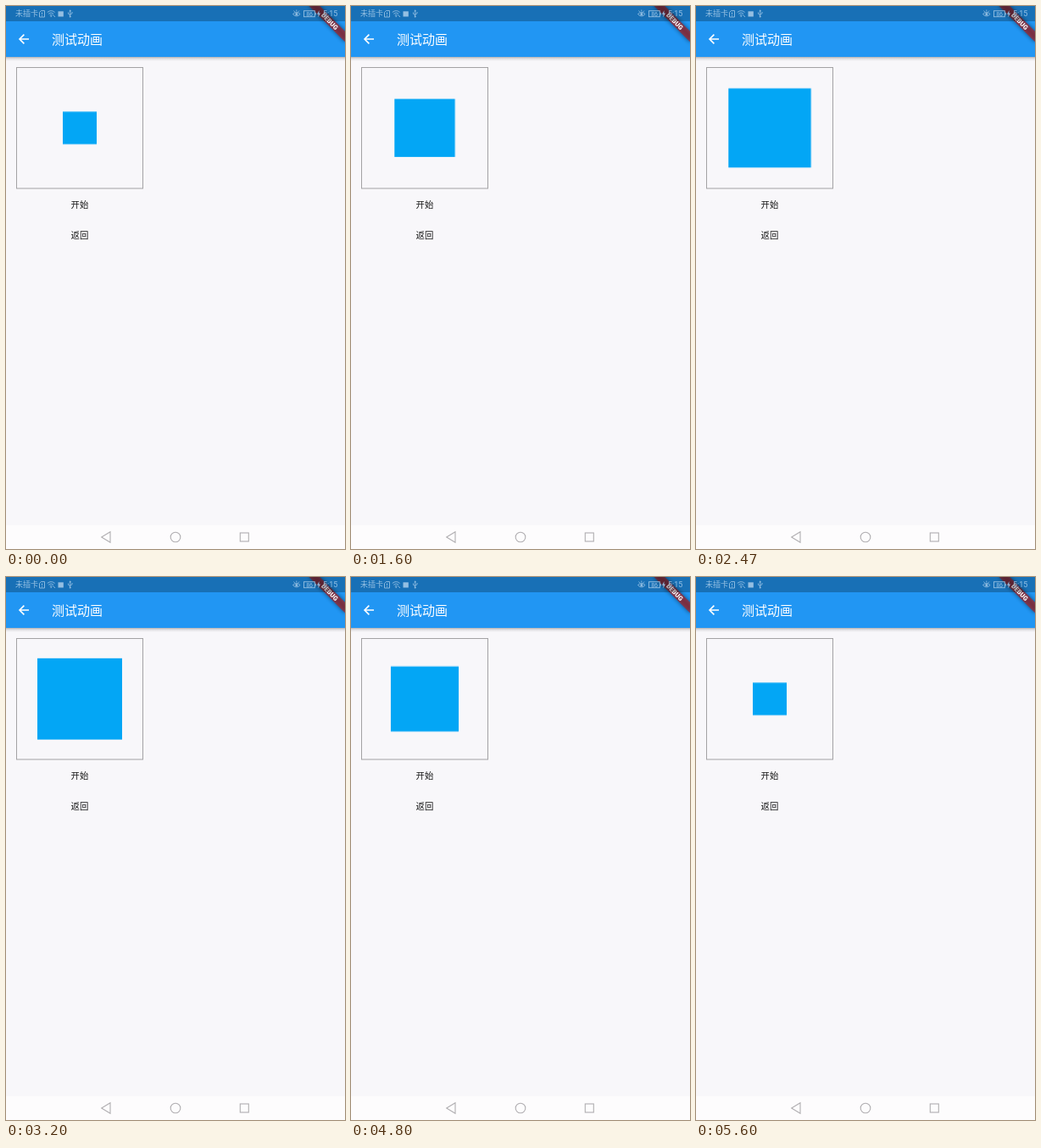
Write an HTML page that moves like this. It is 400 px wide and 640 px high and loops after 5.67 s.

```html
<!DOCTYPE html>
<html lang="zh-CN">
<head>
<meta charset="utf-8">
<title>测试动画</title>
<style>
  html, body { margin: 0; width: 100%; height: 100%; overflow: hidden; background: #f8f7fa; }
  svg { display: block; width: 400px; height: 640px; }
  text { font-family: "Noto Sans CJK SC", "Noto Sans CJK", "Noto Sans", sans-serif; }
  .title { font-size: 15px; font-weight: 500; fill: #fff; }
  .button { font-size: 10.4px; font-weight: 500; fill: #161616; text-anchor: middle; }
  .status { color: #94bfe2; fill: currentColor; font-size: 9px; }
  .status .line { fill: none; stroke: currentColor; stroke-width: .9; }
  .latin { font-family: Roboto, sans-serif; }
  .debug { font: 900 7.65px Roboto, sans-serif; fill: #fff; text-anchor: middle; }
  .nav { fill: none; stroke: #b0aeb1; stroke-width: 1.1; }

  #square {
    transform-origin: 87px 143.7px;
    animation: grow 5670ms infinite paused;
  }
  /* 2 s out with "ease", a pause, then the same curve run backwards */
  @keyframes grow {
    0% { transform: scale(.4); animation-timing-function: linear; }
    17.46% { transform: scale(.4); animation-timing-function: ease; }
    52.73% { transform: scale(1); animation-timing-function: linear; }
    63.14% { transform: scale(1); animation-timing-function: cubic-bezier(.75, 0, .75, .9); }
    98.41%, 100% { transform: scale(.4); }
  }
</style>
</head>
<body>
<svg viewBox="0 0 400 640">
  <defs>
    <filter id="soft" x="-50%" y="-200%" width="200%" height="500%">
      <feGaussianBlur stdDeviation="2.6"/>
    </filter>
    <linearGradient id="shade" x2="0" y2="1">
      <stop stop-opacity=".28"/>
      <stop offset=".4" stop-opacity=".1"/>
      <stop offset="1" stop-opacity="0"/>
    </linearGradient>
  </defs>

  <rect width="400" height="640" fill="#f8f7fa"/>
  <rect y="60" width="400" height="5" fill="url(#shade)"/>
  <rect width="400" height="60" fill="#2196f3"/>
  <path d="M27 39H16.2M21.4 33.6L16 39l5.400 5.400" fill="none" stroke="#fff" stroke-width="1.6"/>
  <text class="title" x="54" y="45.400">测试动画</text>

  <rect x="12.500" y="72.500" width="149" height="142.500" fill="none" stroke="#a3a2a4"/>
  <rect id="square" x="37" y="95.800" width="100" height="95.800" fill="#03a6f5"/>
  <text class="button" x="87" y="238.300">开始</text>
  <text class="button" x="87" y="274.300">返回</text>

  <g transform="translate(400 0) rotate(45)">
    <rect x="-30" y="21" width="60" height="9" opacity=".5" filter="url(#soft)"/>
    <rect x="-32" y="21" width="64" height="9" fill="#b71c1c" fill-opacity=".63"/>
    <text class="debug" x="0" y="28.200">DEBUG</text>
  </g>

  <rect width="400" height="18" fill-opacity=".25"/>
  <g class="status">
    <text x="11" y="12.400">未插卡</text>
    <path class="line" d="M41.500 5.500h4v7.500h-6v-5.500zM42.500 7.500v2.500M42.500 11v1"/>
    <path class="line" d="M48.800 7.400q4.400-3.600 8.800 0M50.300 9.200q2.900-2.400 5.800 0M51.800 11q1.400-1.200 2.800 0"/>
    <circle cx="53.200" cy="12.300" r=".8"/>
    <path class="line" d="M55.500 10.500l2.500 2.500"/>
    <rect x="61.500" y="6.300" width="6.300" height="6.200"/>
    <path class="line" d="M75.700 5.500v7M73.500 7.500v1.800l2.200 1.500M78 7v1.700l-2.300 1.500"/>
    <circle cx="75.700" cy="12.500" r="1"/>
    <path d="M74.300 6.300l1.400-2 1.400 2z"/>
    <path class="line" d="M338.500 9.500q4.300-4.400 8.600 0q-4.300 4.800-8.600 0zM339.500 5.500l1.200 1.400M342.800 4.500v1.800M346 5.500l-1.200 1.400"/>
    <circle cx="342.800" cy="9.500" r="1.500"/>
    <rect class="line" x="351.500" y="5.700" width="12.800" height="7"/>
    <rect x="364.700" y="7.800" width="1" height="2.800"/>
    <text class="latin" x="354.200" y="11.800" font-size="7" style="font-size:7px">86</text>
    <path d="M369.600 5l-2.600 4.700h1.700l-.6 3.800 2.900-5h-1.800z"/>
    <text class="latin" x="374" y="12.300">5:15</text>
  </g>

  <rect y="612" width="400" height="28" fill="#fdfcfd"/>
  <g class="nav">
    <path d="M123 619.800v12.400l-10.300-6.200z"/>
    <circle cx="200" cy="626" r="5.800"/>
    <rect x="276.300" y="621" width="10" height="10"/>
  </g>
</svg>
<script>
  const LOOP = 5670;
  const square = document.getElementById("square");

  function hold(t) {
    const rest = t % 200;
    return t - rest + (rest < 70 ? 0 : rest < 130 ? 70 : 130);
  }

  const player = square.getAnimations()[0];
  const start = performance.now();

  function draw() {
    player.currentTime = hold((performance.now() - start) % LOOP);
    requestAnimationFrame(draw);
  }
  draw();
</script>
</body>
</html>
```
